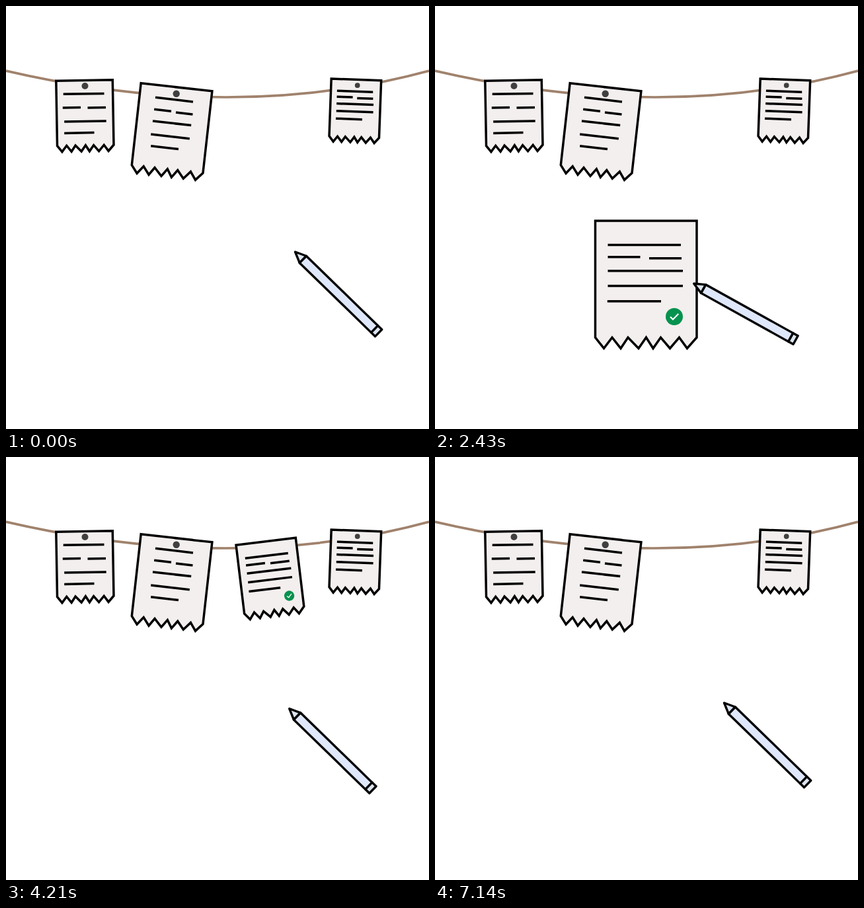
Recreate the animation shown at these times as an HTML page. Size 640 by 640 pixels, loop 7.21 s.

```html
<!DOCTYPE html>
<html lang="en">
<head>
<meta charset="utf-8">
<title>Notes on a line</title>
<style>
  html, body { margin: 0; width: 100%; height: 100%; overflow: hidden; background: #fff; }
  svg { display: block; width: 100%; height: 100%; }
  .sheet { fill: #f3efee; }
  .sheet, .text { stroke: #000; stroke-width: 3.5; vector-effect: non-scaling-stroke; }
  .text { fill: none; }
  .pin { fill: #404040; }
  #pen { fill: #dbe5f1; stroke: #000; stroke-width: 3.4; stroke-linejoin: round; }
</style>
</head>
<body>
<svg viewBox="0 0 640 640">
  <defs>
    <path id="sheet" class="sheet" d="M0 0H153.5V176.5L139 193 127 176.5 113 193 99 176.5 87.5 193 77 176.5 65.5 193 49.5 176.5 38.5 193 25.5 176.5 13 193 0 176.5Z"/>
    <path id="text" class="text" d="M19 36.5H129.5M19 54.7H68M81.5 56.8H130.5M19 75.7H132.5M19 98.4H132.5M18.3 121.7H99.5"/>
    <circle id="pin" class="pin" cx="81" cy="17.8" r="7.9"/>
  </defs>

  <path d="M0 98Q345 178 640 98" fill="none" stroke="#a0826c" stroke-width="3.7"/>

  <use href="#sheet" transform="translate(75.8 113.2) rotate(-1) scale(.557)"/>
  <path class="text" d="M86.7 133.3L148.5 132.4M85.8 154.1L113 153.6M123.5 154.1L151 153.6M88.2 175L151.7 173.9M88.2 192.4L133.5 191.5"/>
  <circle class="pin" cx="119.5" cy="121" r="5"/>

  <use href="#sheet" transform="translate(204.2 116.8) rotate(6.4) scale(.706)"/>
  <path class="text" d="M226 138.2L283 144.9M224.2 156.2L250 159.2M257 161L282.5 164.1M222 174L280.2 180.6M219.2 194L277.8 200.8M219.2 211.8L261 216.6"/>
  <circle class="pin" cx="257.7" cy="132.8" r="5.2"/>

  <g id="last"><use href="#sheet"/><use href="#text"/><use href="#pin"/></g>

  <g id="note">
    <use href="#sheet"/><use href="#text"/>
    <use id="notePin" href="#pin"/>
    <g id="check" transform="translate(119.5 145)">
      <circle r="13" fill="#06924f"/>
      <path d="M-6 .3L-2 4.3 6.3-4.3" fill="none" stroke="#fff" stroke-width="2.2"/>
    </g>
  </g>

  <g id="pen">
    <path d="M0 0L16.5-7.3V7.3Z"/>
    <path d="M16.5-7.3H167.6V7.3H16.5Z" fill="#dfe7fb"/>
    <path d="M167.6-7.3H176V7.3H167.6Z"/>
  </g>
</svg>
<script>
const LOOP = 7210;
const LIFT = 2970;    // note leaves the desk
const PARKED = 3710;  // pen is back, only drifting
const SLIDE = 6360;   // notes move along the rope

const $ = id => document.getElementById(id);
const last = $('last'), note = $('note'), pin = $('notePin'), check = $('check'), pen = $('pen');

const inOut = u => (1 - Math.cos(Math.PI * u)) / 2;
const out = u => Math.sin(Math.PI / 2 * u);
const ramp = (t, from, to) => Math.min(1, Math.max(0, (t - from) / (to - from)));
const lerp = (a, b, p) => a + (b - a) * p;
const tween = (t, from, to, a, b, ease = inOut) => lerp(a, b, ease(ramp(t, from, to)));

// Poses: x, y, angle, scale
const place = (el, { x, y, a, s = 1 }) =>
  el.setAttribute('transform', `translate(${x} ${y}) rotate(${a}) scale(${s})`);
const blend = (p, q, u) => ({
  x: lerp(p.x, q.x, u), y: lerp(p.y, q.y, u), a: lerp(p.a, q.a, u), s: lerp(p.s, q.s, u)
});
const fade = (el, v) => el.setAttribute('opacity', v);

const rest = { x: 437.5, y: 372, a: 44.2 };
const hung = { x: 353.2, y: 133.2, a: -8, s: .592 };
const lastPose = { x: 492.2, y: 110, a: 2.1, s: .492 };
const exitPose = { x: 648, y: 87, a: 2.1, s: .492 };

function penPose(t) {
  if (t >= PARKED) {
    const d = 13.3 * ((LOOP - t) / (LOOP - PARKED)) ** 2.7;
    return { x: rest.x - d, y: rest.y + d, a: rest.a };
  }
  return {
    x: t < 1500 ? tween(t, 0, 1470, rest.x, 372) : tween(t, 1500, PARKED, 372, 424.2),
    y: t < 1690 ? tween(t, 0, 1070, rest.y, 461.5) : tween(t, 1690, PARKED, 461.5, 385.3, out),
    a: t < 1070 ? tween(t, 0, 1070, rest.a, -10.8) : tween(t, 1070, PARKED, -10.8, rest.a, out)
  };
}

// Height settles first, then size, sideways position and tilt
function notePose(t) {
  const fly = (ms, a, b) => tween(t, LIFT, LIFT + ms, a, b);
  return {
    x: fly(1440, 242.5, hung.x),
    y: t < LIFT ? tween(t, 100, 1260, 390, 325) : fly(990, 325, hung.y),
    a: fly(1640, 0, hung.a),
    s: fly(1060, 1, hung.s)
  };
}

function draw(t) {
  const slide = tween(t, SLIDE, 7140, 0, 1);
  const pinned = ramp(t, 4740, 4900);

  place(last, blend(lastPose, exitPose, slide));
  place(note, blend(notePose(t), lastPose, slide));
  place(pen, penPose(t));
  fade(note, ramp(t, 30, 600));
  fade(pin, pinned);
  fade(check, ramp(t, 1600, 1900) * (1 - pinned));
}

const start = performance.now();
function tick() {
  draw((performance.now() - start) % LOOP);
  requestAnimationFrame(tick);
}
draw(0);
requestAnimationFrame(tick);
</script>
</body>
</html>
```
